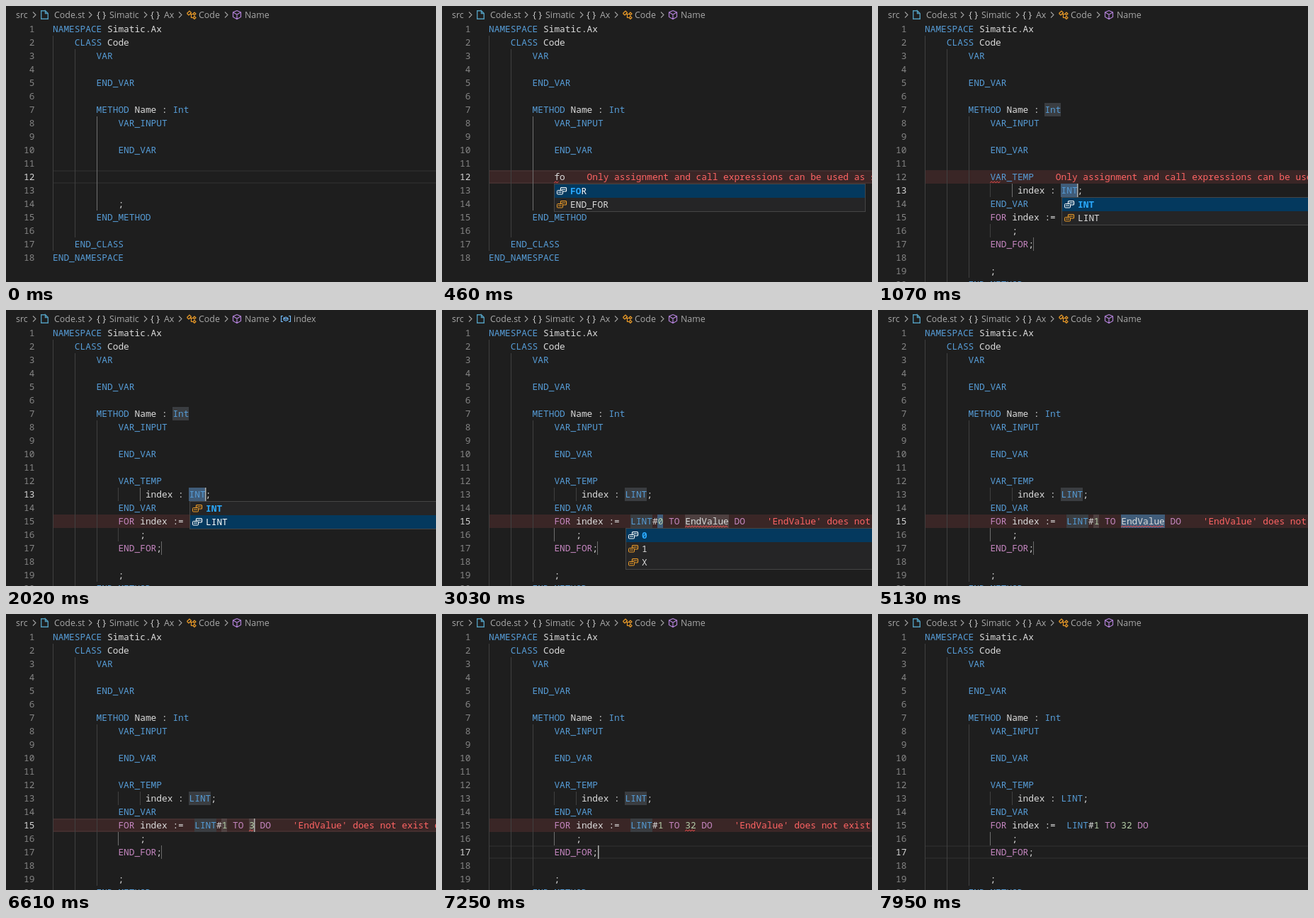
Animation, 607 px wide and 390 px high, one loop 8000 ms. Source, as an HTML page with a canvas:

```html
<!DOCTYPE html>
<html lang="en">
<head>
<meta charset="utf-8">
<title>Structured text editor</title>
<style>
  html, body { margin: 0; width: 100%; height: 100%; overflow: hidden; background: #1e1e1e; }
  canvas { display: block; }
</style>
</head>
<body>
<canvas id="stage" width="607" height="390"></canvas>
<script>
const ctx = document.getElementById('stage').getContext('2d');
const LOOP = 8000, CH = 7.7, LEFT = 66, ROW = 19;
const MONO = '12.83px "Noto Sans Mono", "DejaVu Sans Mono", monospace';
const SANS = '12.4px "Open Sans", "Noto Sans", sans-serif';
const BLUE = '#569cd6', PINK = '#c586c0', TEXT = '#dcdcdc', NUM = '#b5cea8';
const ORANGE = '#ee9d28', ERR = '#ff6464', DIM = '#404040', LIT = '#707070';
const MARK = '#3a3d41', HOLD = 'rgba(124,124,124,0.3)', SEL = '#264f78';

const colX = c => LEFT + c * CH;
const rowY = n => 23 + (n - 1) * ROW;

function fill(x, y, w, h, color) {
  ctx.fillStyle = color;
  ctx.fillRect(x, y, w, h);
}

function write(str, x, y, color, font = MONO) {
  ctx.font = font;
  ctx.fillStyle = color;
  ctx.fillText(str, x, y);
}

function path(color, width, ...lines) {
  ctx.strokeStyle = color;
  ctx.lineWidth = width;
  ctx.beginPath();
  for (const pts of lines)
    pts.forEach(([x, y], i) => i ? ctx.lineTo(x, y) : ctx.moveTo(x, y));
  ctx.stroke();
}

const code = (row, col, str, color = TEXT) => write(str, colX(col), rowY(row) + 14, color);

// Background over a run of characters
const mark = (row, col, len, color) => fill(Math.floor(colX(col)), rowY(row), Math.round(len * CH), ROW, color);

function guide(col, from, to, color = DIM) {
  const y = rowY(from);
  fill(Math.round(colX(col)), y, 1, Math.min(rowY(to + 1), 390) - y, color);
}

function squiggle(row, col, len) {
  const pts = [], end = len * CH;
  for (let i = 0; i * 2 <= end; i++) pts.push([colX(col) + i * 2, rowY(row) + (i % 2 ? 15.8 : 18)]);
  path('#f14c4c', 1, pts);
}

const errorBand = row => fill(LEFT, rowY(row), 541, ROW, 'rgba(228,84,84,0.14)');

function lineBorder(row) {
  fill(LEFT, rowY(row), 541, 2, '#282828');
  fill(LEFT, rowY(row) + 17, 541, 2, '#282828');
}

function caret(row, col) {
  fill(Math.floor(colX(col)), rowY(row), 1.5, ROW, '#aeafad');
}

function chevron(x) {
  path('#a0a0a0', 1.1, [[x - 2, 8.5], [x + 2, 12.5], [x - 2, 16.5]]);
}

function braces(x) {
  write('{ }', x, 16.5, '#cccccc', '13px "Open Sans", "Noto Sans", sans-serif');
}

function fileIcon() {
  path('#519aba', 1.4,
    [[55.5, 6.7], [49.7, 6.7], [49.7, 18.3], [59.3, 18.3], [59.3, 10.5], [55.5, 6.7], [55.5, 10.5], [59.3, 10.5]]);
}

function classIcon() {
  path(ORANGE, 1.2,
    [[255.5, 10.5], [259, 7], [261.5, 9.5], [258, 13], [255.5, 10.5]],
    [[260, 11.5], [264, 11.5]], [[261.5, 11.5], [261.5, 16.5], [264, 16.5]],
    [[264, 11], [266, 9], [268, 11], [266, 13], [264, 11]],
    [[264, 16.5], [266, 14.5], [268, 16.5], [266, 18.5], [264, 16.5]]);
}

function methodIcon() {
  path('#b180d7', 1.2,
    [[326, 6.5], [331.5, 9], [331.5, 15.5], [326, 18.5], [320.5, 15.5], [320.5, 9], [326, 6.5]],
    [[320.5, 9], [326, 12], [331.5, 9]], [[326, 12], [326, 18.5]]);
}

function fieldIcon() {
  path('#75beff', 1.1,
    [[391, 8.5], [388.5, 8.5], [388.5, 16.5], [391, 16.5]],
    [[399, 8.5], [401.5, 8.5], [401.5, 16.5], [399, 16.5]],
    [[392, 11.5], [395, 10], [398, 11.5], [398, 14], [395, 15.5], [392, 14], [392, 11.5], [395, 13], [398, 11.5]]);
}

function breadcrumb(inField) {
  const items = [['src', 14], ['Code.st', 68], ['Simatic', 146], ['Ax', 223], ['Code', 272], ['Name', 337]];
  const arrows = [40, 119, 197, 246, 311];
  if (inField) {
    items.push(['index', 406]);
    arrows.push(379);
    fieldIcon();
  }
  items.forEach(([s, x]) => write(s, x, 17, '#a9a9a9', SANS));
  arrows.forEach(chevron);
  fileIcon();
  braces(128);
  braces(204);
  classIcon();
  methodIcon();
}

function valueIcon(x, cy, color, back) {
  ctx.lineWidth = 1.2;
  [[5, -5], [0, -1]].forEach(([dx, dy]) => {
    ctx.beginPath();
    ctx.roundRect(x + dx + 0.5, cy + dy + 0.5, 8, 5.5, 1);
    ctx.fillStyle = back;
    ctx.fill();
    ctx.strokeStyle = color;
    ctx.stroke();
    path(color, 1, [[x + dx + 2, cy + dy + 3], [x + dx + 7, cy + dy + 3]]);
  });
}

// Suggestion list; hit is the matched part of a label
function suggest(row, col, items, selected, hit) {
  const x = Math.round(colX(col)), y = rowY(row + 1), h = items.length * ROW + 1;
  fill(x, y, 440, h + 1, '#454545');
  fill(x + 1, y + 1, 438, h - 1, '#252526');
  items.forEach((label, i) => {
    const top = y + 1 + i * ROW, on = i === selected, back = on ? '#04395e' : '#252526';
    if (on) fill(x + 1, top, 438, ROW, back);
    valueIcon(x + 4, top + 9, on ? '#ffffff' : ORANGE, back);
    const at = label.indexOf(hit), lx = x + 23, base = top + 14;
    write(label, lx, base, on ? '#ffffff' : TEXT);
    if (at === 0) {
      fill(lx, top, hit.length * CH, ROW, back);
      write(hit, lx, base, '#2aaaff', 'bold ' + MONO);
    }
  });
}

function numbers(count, active) {
  ctx.textAlign = 'right';
  for (let n = 1; n <= count; n++)
    write(n, 40.5, rowY(n) + 14, n === active ? '#d6d6d6' : '#858585');
  ctx.textAlign = 'left';
}

function head() {
  code(1, 0, 'NAMESPACE', BLUE);
  code(1, 10, 'Simatic.Ax');
  code(2, 4, 'CLASS', BLUE);
  code(2, 10, 'Code');
  code(3, 8, 'VAR', BLUE);
  code(5, 8, 'END_VAR', BLUE);
  code(7, 8, 'METHOD', BLUE);
  code(7, 15, 'Name :');
  code(7, 22, 'Int', BLUE);
  code(8, 12, 'VAR_INPUT', BLUE);
  code(10, 12, 'END_VAR', BLUE);
}

const stmtError = 'Only assignment and call expressions can be used as statements';

function typing(t) {
  const typed = t < 80 ? '' : t < 230 ? 'f' : 'fo';
  lineBorder(12);
  if (t >= 460) errorBand(12);
  guide(0, 2, 17);
  guide(4, 3, 16);
  guide(8, 8, 14, LIT);
  numbers(18, 12);
  head();
  code(12, 12, typed);
  code(14, 12, ';');
  code(15, 8, 'END_METHOD', BLUE);
  code(17, 4, 'END_CLASS', BLUE);
  code(18, 0, 'END_NAMESPACE', BLUE);
  if (t >= 460) {
    code(12, 18, stmtError, ERR);
    squiggle(12, 12, t < 690 ? 1 : 2);
  }
  if (!typed) return;
  if (t < 460 || t >= 690) caret(12, 12 + typed.length);
  const all = ['FOR', 'FALSE', 'IF', 'ELSIF', 'END_FOR', 'END_IF', 'REF'];
  suggest(12, 12, t < 310 ? all : ['FOR', 'END_FOR'], 0, t < 310 ? 'F' : 'FO');
}

function filling(t) {
  const naming = t < 2340, done = t >= 7160;
  const active = naming ? 13 : done ? 17 : 15;
  const type = naming ? 'INT' : 'LINT';
  const start = t < 4600 ? '0' : '1';
  const end = t < 6610 ? 'EndValue' : t < 6760 ? '3' : '32';
  const endCol = 36 + end.length;
  const loopError = t >= 1610 && t < 7480;

  if (done) lineBorder(17);
  else if (t >= 6610) lineBorder(15);
  if (t < 1380) errorBand(12);
  if (loopError) errorBand(15);

  guide(0, 2, 20);
  guide(4, 3, 20);
  guide(8, 8, 19);
  guide(12, 13, 13);
  guide(16, 13, 13, naming ? LIT : DIM);
  guide(12, 16, 16, naming ? DIM : LIT);

  if (naming) {
    mark(7, 22, 3, MARK);
    mark(13, 25, 3, SEL);
    mark(13, 25, 3, HOLD);
  } else if (t < 7320) {
    mark(13, 25, 4, MARK);
    mark(15, 26, 4, MARK);
  }
  if (!done) {
    if (!naming && t < 4600) mark(15, 31, 1, SEL);
    if (t >= 4600 && t < 6610) mark(15, 36, 8, SEL);
    mark(15, 31, 1, HOLD);
    mark(15, 36, end.length, HOLD);
    fill(219, rowY(17), 1, ROW, '#6a6a6a');
  }

  numbers(20, active);
  head();
  code(12, 12, 'VAR_TEMP', BLUE);
  code(13, 17, 'index :');
  code(13, 25, type, BLUE);
  code(13, 25 + type.length, ';');
  code(14, 12, 'END_VAR', BLUE);
  code(15, 12, 'FOR', PINK);
  code(15, 16, 'index :=');
  code(15, 26, 'LINT', BLUE);
  code(15, 30, '#');
  code(15, 31, start, NUM);
  code(15, 33, 'TO', PINK);
  code(15, 36, end, t < 6610 ? TEXT : NUM);
  code(15, endCol + 1, 'DO', PINK);
  code(16, 16, ';');
  code(17, 12, 'END_FOR', PINK);
  code(17, 19, ';');
  code(19, 12, ';');
  code(20, 8, 'END_METHOD', BLUE);

  if (t < 1380) {
    code(12, 24, stmtError, ERR);
    squiggle(12, 12, 2);
  }
  if (loopError) {
    code(15, endCol + 7, "'EndValue' does not exist or is not accessible", ERR);
    squiggle(15, 36, end.length);
  }

  if (naming) {
    suggest(13, 25, ['INT', 'LINT'], t < 2020 ? 0 : 1, 'INT');
    if (t < 1540 || t >= 2020) caret(13, 28);
  } else if (t < 4600) {
    suggest(15, 25, ['0', '1', 'X'], t < 4050 ? 0 : 1, '0');
    if (t < 2880 || (t >= 3360 && t < 3830) || t >= 4280) caret(15, 32);
  } else if (!done) {
    if (t < 5130 || (t >= 5600 && t < 6150) || t >= 6610) caret(15, endCol);
  } else if (t < 7950) {
    caret(17, 20);
  }
}

function draw(t) {
  fill(0, 0, 607, 390, '#1e1e1e');
  if (t < 1070) typing(t);
  else filling(t);
  breadcrumb(t >= 1380 && t < 2690);
}

let begin;
function tick(now) {
  begin ??= now;
  draw((now - begin) % LOOP);
  requestAnimationFrame(tick);
}
draw(0);
requestAnimationFrame(tick);
</script>
</body>
</html>
```
